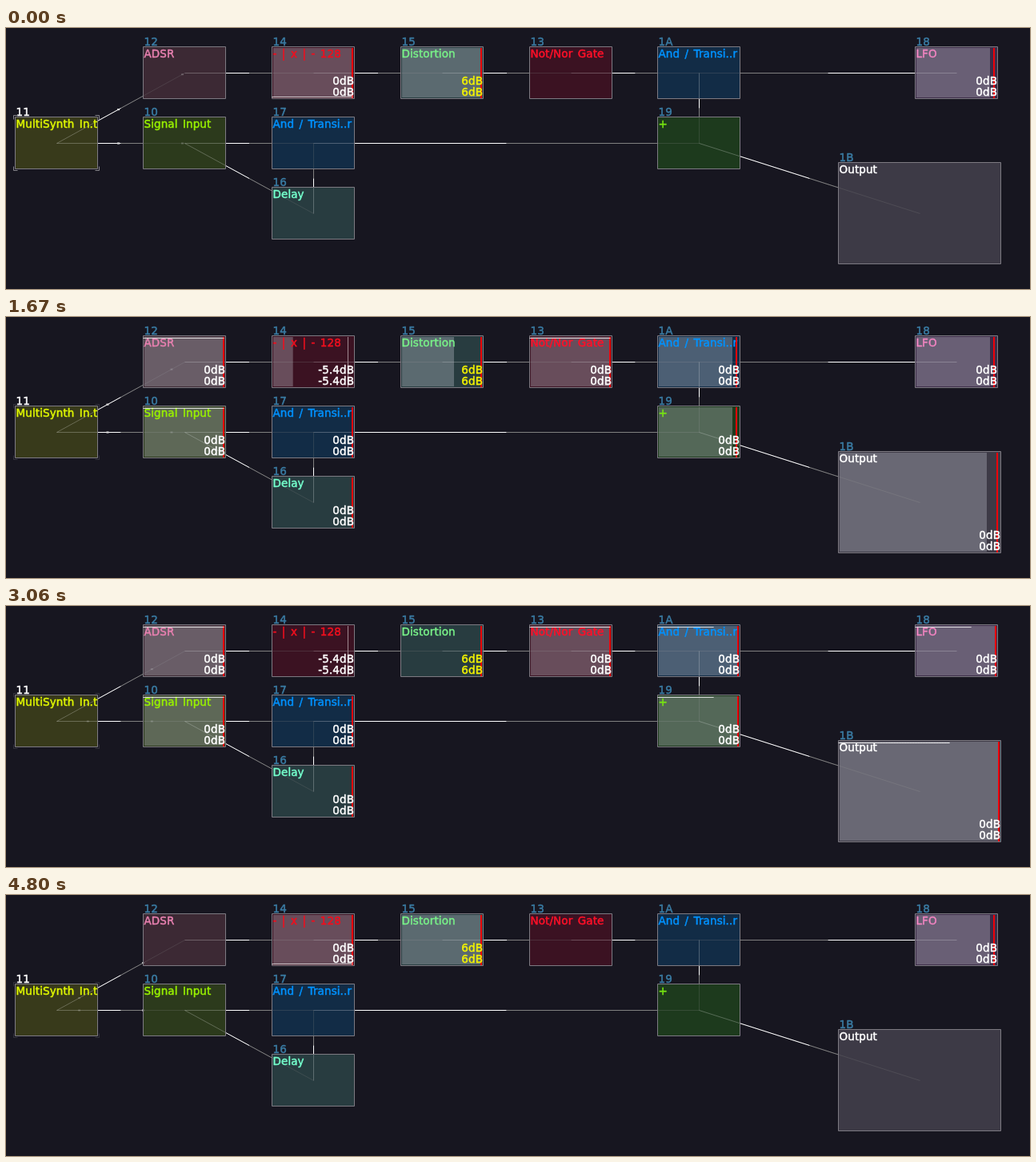
An HTML page with a canvas that plays this animation: 1280 px wide and 327 px high, repeating every 4.87 s.

```html
<!DOCTYPE html>
<html lang="en">
<head>
<meta charset="utf-8">
<title>Module graph</title>
<style>
html, body { margin: 0; width: 100%; height: 100%; overflow: hidden; background: #171620; }
canvas { display: block; }
</style>
</head>
<body>
<canvas id="stage" width="1280" height="327"></canvas>
<script>
const ctx = document.getElementById('stage').getContext('2d');
const LOOP = 4870, STEP = LOOP / 70;
const GATE_ON = 9.55, GATE_OFF = 45;
const LFO_PERIOD = 5.62, LFO_LOW = 2.87, LFO_FALL = 43.7;

// Signals: s counts animation steps, 0 means silence
const within = (s, a, b) => (s >= a && s < b ? 1 : 0);
const clamp = v => Math.min(1, Math.max(0, v));
const mod = (a, b) => ((a % b) + b) % b;
const gate = s => within(s, GATE_ON, GATE_OFF);
const env = s => (s < GATE_OFF ? clamp((s - 9.931) / 8) : 0);
const lfo = s => (mod(s - LFO_FALL, LFO_PERIOD) >= LFO_LOW ? 1 : 0);
const pulse = s => within(s, GATE_ON, 12);
const inverse = s => within(s, 18, GATE_OFF);
const both = s => inverse(s) * lfo(s);
const sum = s => Math.max(pulse(s), both(s));

// hold: the steps during which the peak label stays visible
function box(id, name, col, row, fill, ink, signal, hold) {
  const x = Math.floor(11 + 160.75 * col) + 0.5, y = 23.5 + 88 * row;
  return { id, name, x, y, w: 103, h: 65, fill, ink, signal, hold };
}
const ALWAYS = [0, 70];
const modules = [
  box('11', 'MultiSynth In.t', 0, 1, '#383a1b', '#e0f800', () => 0, [0, 0]),
  box('12', 'ADSR', 1, 0, '#3c2934', '#e880b0', env, [10, 60]),
  box('14', '- | x | - 128', 2, 0, '#3b1222', '#f00f1e', s => env(s) - 1, ALWAYS),
  box('15', 'Distortion', 3, 0, '#283c40', '#78f088', s => (within(s, 20, GATE_OFF) ? 0 : 2), ALWAYS),
  box('13', 'Not/Nor Gate', 4, 0, '#3b1222', '#ff1028', inverse, [18, 60]),
  box('1A', 'And / Transi..r', 5, 0, '#122c46', '#0092ff', both, [18, 60]),
  box('18', 'LFO', 7, 0, '#3c2c48', '#f084c0', lfo, ALWAYS),
  box('10', 'Signal Input', 1, 1, '#2c3a1c', '#98f000', gate, [10, 50]),
  box('17', 'And / Transi..r', 2, 1, '#122c46', '#0092ff', pulse, [10, 50]),
  box('16', 'Delay', 2, 2, '#283c40', '#74ffcc', s => Math.max(pulse(s), within(s, 45, 46)), [10, 50]),
  box('19', '+', 5, 1, '#1d3a1d', '#78e810', sum, [10, 50]),
  { id: '1B', name: 'Output', x: 1040.5, y: 168.5, w: 203, h: 127,
    fill: '#3d3a46', ink: '#fff', signal: sum, hold: [10, 50] }
];
const byId = Object.fromEntries(modules.map(m => [m.id, m]));
const links = ['11>12', '11>10', '12>14', '14>15', '15>13', '13>1A', '18>1A', '1A>19',
  '10>17', '10>16', '16>17', '17>19', '19>1B'].map(l => l.split('>').map(id => byId[id]));

const toDb = v => 20 * Math.log10(v);
const center = m => [m.x + m.w / 2, m.y + m.h / 2];

function line(x1, y1, x2, y2, color) {
  ctx.strokeStyle = color;
  ctx.beginPath();
  ctx.moveTo(x1, y1);
  ctx.lineTo(x2, y2);
  ctx.stroke();
}

function text(str, x, y, color, align = 'left') {
  ctx.textAlign = align;
  ctx.fillStyle = ctx.strokeStyle = color;
  ctx.fillText(str, x, y);
  ctx.lineWidth = 0.5;
  ctx.strokeText(str, x, y);
  ctx.lineWidth = 1;
}

function drawLinks(n) {
  const phase = (77 + 0.0398 * n * STEP) % 80;
  for (const [from, to] of links) {
    const [x1, y1] = center(from).map(v => Math.floor(v) + 0.5);
    const [x2, y2] = center(to).map(v => Math.floor(v) + 0.5);
    const mx = (x1 + x2) / 2, my = (y1 + y2) / 2;
    line(mx, my, x2, y2, '#808080');
    line(x1, y1, mx, my, '#fff');
    if (from.id !== '11') continue;
    ctx.fillStyle = '#d8d8d8';
    for (const d of [phase, phase + 80]) {
      const y = y1 + (y2 - y1) * d / 160;
      ctx.fillRect(x1 + d - 1.5, y - 1, 3, 2);
    }
  }
}

// Loudest value in the scope window that ends at step n
function peak(m, n) {
  let p = 0;
  for (let i = 0; i <= 20; i++) p = Math.max(p, Math.abs(m.signal(n - 1 + i / 20)));
  return Math.min(1, p);
}

// Meter width on a dB scale, falling after the sound stops
const fade = k => (k === 0 ? 0 : k < 3 ? 0.08 : 0.0875 * k);
function meter(m, n) {
  let best = 0;
  for (let k = 0; k < 12; k++) {
    const p = peak(m, n - k);
    if (p) best = Math.max(best, 1 + toDb(p) / 82 - fade(k));
  }
  return best;
}

function heldDb(m, n) {
  if (m.id === '12' && n < 18) return toDb(env(n));
  if (m.id === '14') return toDb(Math.max(peak(m, n), 0.537));
  return 0;
}

function drawScope(m, n) {
  const [, mid] = center(m), amp = m.h / 2 - 2.5, count = 100;
  let last = 0;
  ctx.strokeStyle = '#fff';
  ctx.beginPath();
  for (let i = 0; i <= count; i++) {
    const v = m.signal(n - 1 + i / count);
    const x = m.x + 1 + (m.w - 3) * i / count, y = mid - amp * v + 0.5;
    if (v && Math.abs(v) <= 1) {
      if (!last) ctx.moveTo(x - 1, i ? mid : y);
      ctx.lineTo(x, y);
    }
    last = v;
  }
  ctx.stroke();
}

function drawPeak(m, n, level) {
  const db = heldDb(m, n), right = m.x + m.w;
  if (db > -20) {
    const shift = level > 0.9 && level < 1 ? 2 : 0;
    const red = db > -0.05;
    ctx.fillStyle = red ? '#f00008' : '#a08890';
    ctx.fillRect(Math.floor(right - 3 - shift + db), m.y + 1.5, red ? 2 : 1, m.h - 2);
  }
  const loud = m.id === '15';
  const label = loud ? '6dB' : (Math.round(db * 10) / 10 || 0) + 'dB';
  for (const up of [17.5, 3.5]) text(label, right - 0.5, m.y + m.h - up, loud ? '#f4f400' : '#fff', 'right');
}

function drawModule(m, n) {
  const level = meter(m, n);
  ctx.fillStyle = 'rgba(200,202,212,.32)';
  if (level > 0) ctx.fillRect(m.x + 1.5, m.y + 1.5, (m.w - 3) * level, m.h - 3);
  ctx.strokeStyle = '#7d7a82';
  ctx.strokeRect(m.x, m.y, m.w, m.h);
  text(m.id, m.x + 1, m.y - 1.5, m.id === '11' ? '#fff' : '#3a7ca4');
  text(m.name, m.x + 1, m.y + 13, m.ink);
  if (n >= m.hold[0] && n < m.hold[1]) drawPeak(m, n, level);
  drawScope(m, n);
}

// Selection brackets around the first module
function drawCorners(n) {
  const m = modules[0];
  const [cx, cy] = center(m);
  ctx.globalAlpha = Math.max(1 - n / 5, within(n, 35, 42), within(n, 58, 62), 0.25);
  for (const sx of [-1, 1]) for (const sy of [-1, 1]) {
    const x = cx + sx * (m.w / 2 + 2), y = cy + sy * (m.h / 2 + 2);
    line(x, y, x - sx * 5, y, '#85848a');
    line(x, y, x, y - sy * 5, '#85848a');
  }
  ctx.globalAlpha = 1;
}

function draw(n) {
  ctx.fillStyle = '#171620';
  ctx.fillRect(0, 0, 1280, 327);
  ctx.font = '13.5px "DejaVu Sans", sans-serif';
  ctx.letterSpacing = '0.1px';
  ctx.wordSpacing = '2px';
  ctx.lineWidth = 1;
  ctx.lineJoin = 'round';
  drawLinks(n);
  for (const m of modules) {
    ctx.fillStyle = m.fill;
    ctx.fillRect(m.x, m.y, m.w, m.h);
  }
  // Links shine faintly through the boxes
  ctx.globalAlpha = 0.25;
  drawLinks(n);
  ctx.globalAlpha = 1;
  for (const m of modules) drawModule(m, n);
  drawCorners(n);
}

const start = performance.now();
function tick() {
  const t = (performance.now() - start) % LOOP;
  draw(Math.min(69, Math.floor((t + 10) / STEP)));
  requestAnimationFrame(tick);
}
tick();
</script>
</body>
</html>
```
